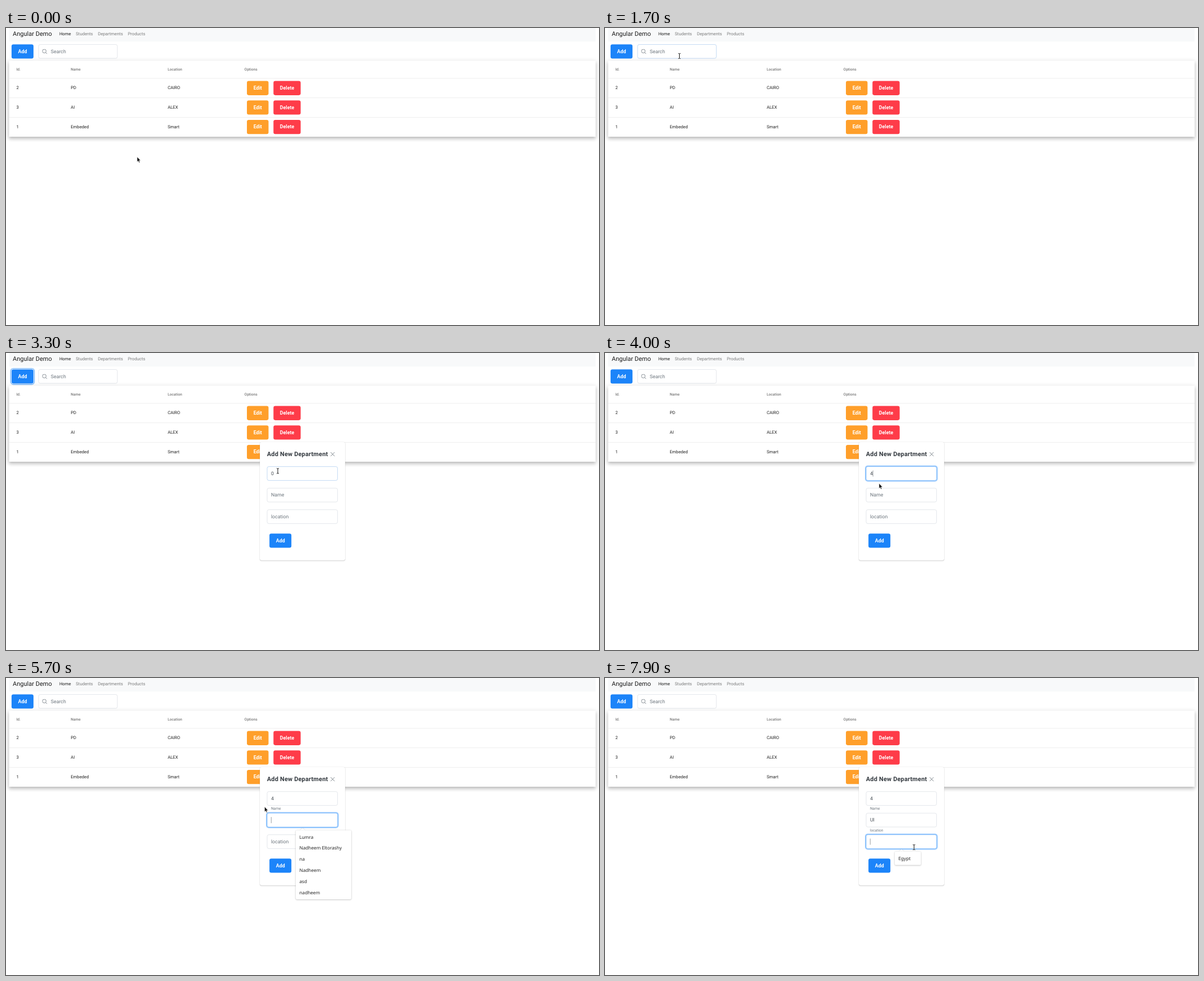
An HTML page that plays this animation: 1056 px wide and 530 px high, repeating every 8 s.

```html
<!DOCTYPE html>
<html lang="en">
<head>
<meta charset="utf-8">
<title>Angular Demo</title>
<style>
  :root { --blue: #1c84f9; }
  html, body { margin: 0; width: 100%; height: 100%; overflow: hidden; background: #fff; }
  * { box-sizing: border-box; }
  /* The page is laid out 1920 px wide and shown at 55 % */
  #page {
    position: absolute; left: 0; top: 0; width: 1920px; height: 964px;
    transform: scale(.55); transform-origin: 0 0;
    font: 16px Roboto, sans-serif; color: rgba(0,0,0,.87);
    text-rendering: geometricPrecision; overflow: hidden;
  }
  #page div, #page span, #page button { position: absolute; white-space: nowrap; }
  nav { position: absolute; left: 10px; top: 0; width: 1899px; height: 44px; background: #f8f9fa; }
  nav span { line-height: 38px; font-size: 14px; color: rgba(0,0,0,.5); }
  nav .brand { left: 12px; font-size: 20px; color: rgba(0,0,0,.9); }
  nav .on { color: rgba(0,0,0,.9); }
  .btn {
    height: 46px; padding: 0; border: 0; border-radius: 6px;
    font: 700 16px/46px Roboto, sans-serif; color: #fff; text-align: center;
    background: var(--blue);
  }
  .warn { background: #ff9f2a; }
  .danger { background: #fe3c49; }
  .field {
    height: 46px; border: 1px solid #ced4da; border-radius: 6px; background: #fff;
    line-height: 44px; color: #495057;
  }
  .field span { left: 12px; top: 0; }
  #search span { left: 39px; color: #6c757d; }
  #search svg { position: absolute; left: 11px; top: 14px; }
  #card {
    left: 10px; top: 106px; width: 1899px; height: 247px; background: #fff;
    box-shadow: 0 5px 5px -3px rgba(0,0,0,.2), 0 8px 10px 1px rgba(0,0,0,.14), 0 3px 14px 2px rgba(0,0,0,.12);
  }
  .row { left: 0; width: 100%; height: 63.3px; border-top: 1px solid #e0e0e0; font-size: 14px; line-height: 62px; }
  .head { height: 57px; border: 0; font-size: 12px; font-weight: 500; line-height: 57px; color: rgba(0,0,0,.54); }
  #dialog {
    left: 822px; top: 289px; width: 276px; height: 384px; background: #fff;
    border-radius: 6px; box-shadow: 0 1px 3px rgba(0,0,0,.3);
  }
  #dialog .field { left: 23px; width: 229px; }
  #dialog .title { left: 23px; top: 24px; font-size: 20px; font-weight: 700; line-height: 30px; letter-spacing: .3px; color: #343a40; }
  #dialog > svg { position: absolute; left: 228px; top: 32px; }
  #dialog .label { left: 36px; line-height: 20px; color: #6c757d; }
  .caret { top: 12px; width: 1px; height: 20px; background: #495057; }
  .menu {
    left: 938px; padding: 4px 0; background: #fff; border-radius: 4px;
    filter: drop-shadow(0 1px 2px rgba(0,0,0,.3));
    font: 14.9px/36px "Noto Sans", sans-serif; color: #222;
  }
  #page .menu div { position: static; padding-left: 12px; }
  .menu::before {
    content: ""; position: absolute; left: 14px; top: -7px;
    border: 8px solid transparent; border-top: 0; border-bottom: 7px solid #fff;
  }
  #pointer { position: absolute; left: 0; top: 0; width: 1056px; height: 530px; }
</style>
</head>
<body>
<div id="page">
  <nav>
    <span class="brand">Angular Demo</span>
    <span class="on" style="left:162.5px">Home</span>
    <span style="left:216px">Students</span>
    <span style="left:287.5px">Departments</span>
    <span style="left:384.5px">Products</span>
  </nav>
  <button class="btn" id="add" style="left:18px;top:53px;width:71px">Add</button>
  <div class="field" id="search" style="left:105px;top:53px;width:256px">
    <svg width="17" height="17" fill="none" stroke="#6c757d" stroke-width="1.5"><circle cx="7" cy="7" r="6"/><path d="M11.4 11.4L16 16"/></svg>
    <span>Search</span>
  </div>
  <div id="card"></div>
  <div id="dialog">
    <span class="title">Add New Department</span>
    <svg width="15" height="15" stroke="#6c757d" stroke-width="1.6"><path d="M1 1L14 14M14 1L1 14"/></svg>
    <div class="field" style="top:79px"><span></span><div class="caret"></div></div>
    <div class="field" style="top:149px"><span></span><div class="caret"></div></div>
    <div class="field" style="top:219px"><span></span><div class="caret"></div></div>
    <span class="label">Name</span>
    <span class="label">location</span>
    <button class="btn" style="left:31px;top:297px;width:71px">Add</button>
  </div>
  <div class="menu" id="names" style="top:494px;width:180px"><div>Lumra</div><div>Nadheem Eltorashy</div><div>na</div><div>Nadheem</div><div>asd</div><div>nadheem</div></div>
  <div class="menu" id="places" style="top:563px;width:85px"><div>Egypt</div></div>
</div>
<svg id="pointer" viewBox="0 0 1056 530">
  <defs><path id="stem" d="M-2-4.6Q0-4.6 0-3.6Q0-4.6 2-4.6M0-3.8V3.8M-2 4.6Q0 4.6 0 3.6Q0 4.6 2 4.6"/></defs>
  <path id="arrow" d="M0 0V8.9L2 7.1L3.4 10.3L4.9 9.7L3.5 6.6H6.2Z" fill="#111" stroke="#fff" stroke-width=".5"/>
  <g id="beam" fill="none"><use href="#stem" stroke="#fff" stroke-width="1.9" opacity=".7"/><use href="#stem" stroke="#111"/></g>
  <path id="hand" d="M-.8 .6Q0-.4 .8 .6V3L4.2 3.8Q5.2 4.2 5 5.4L4.3 8.8H.2L-2.2 5.6Q-2.4 4.4-.8 5Z" fill="#111" stroke="#fff" stroke-width=".4"/>
</svg>
<script>
const LOOP = 8000, STEP = 100, SCALE = .55;
const $ = s => document.querySelector(s), $$ = s => [...document.querySelectorAll(s)];

// Table
const COLS = [23.5, 199.5, 513.5, 762];
const cells = texts => texts.map((s, i) => `<span style="left:${COLS[i]}px">${s}</span>`).join('');
const button = (kind, text, left, width) =>
  `<button class="btn ${kind}" style="left:${left}px;top:7.5px;width:${width}px">${text}</button>`;
$('#card').innerHTML =
  `<div class="row head">${cells(['Id.', 'Name', 'Location', 'Options'])}</div>` +
  [['2', 'PD', 'CAIRO'], ['3', 'AI', 'ALEX'], ['1', 'Embeded', 'Smart']].map((r, i) =>
    `<div class="row" style="top:${57 + i * 63.3}px">${cells(r)}` +
    button('warn', 'Edit', 770, 70) + button('danger', 'Delete', 856, 88) + '</div>').join('');

// Script of the session, in ms
const OPEN = 2500, CLICKS = [3300, 4300, 7300], ID_KEY = 4000, NAME_KEYS = [6200, 6400];
const EVENTS = [...CLICKS, ID_KEY, ...NAME_KEYS];

// Pointer legs: start, end, destination
const HOME = [233.5, 230];
const LEGS = [
  [700, 1600, 150.5, 59.5], [1600, 1700, 132.5, 50], [1700, 2300, 74, 23.5], [2300, 2500, 48.3, 40.5],
  [2600, 2700, 68, 48], [2800, 3000, 391, 181], [3100, 3300, 484, 210.5], [3800, 4200, 492, 255],
  [4900, 5100, 517, 262], [5200, 5400, 460.5, 229.8], [6900, 7200, 550.3, 286], [7300, 7500, 550.3, 302]
];

const ramp = (t, from, to) => Math.min(1, Math.max(0, (t - from) / (to - from)));
const ease = (t, from, time = 300) => 1 - (1 - ramp(t, from, from + time)) ** 2;
const pulse = (t, on, off) => ease(t, on) - ease(t, off);

const pointerAt = t => LEGS.reduce(([x, y], [from, to, nx, ny]) => {
  const p = ramp(t, from, to);
  return [x + (nx - x) * p, y + (ny - y) * p];
}, HOME);

function isOver(t, left, top, width) {
  const [x, y] = pointerAt(t).map(v => v / SCALE);
  return x >= left && x <= left + width && y >= top && y <= top + 46;
}
const overSearch = t => isOver(t, 105, 53, 256);
const overInput = (t, i) => t > OPEN && isOver(t, 845, 368 + 70 * i, 229);
const fade = over => t => (over(t) + over(t - STEP)) / 2;

const inputs = $$('#dialog .field'), labels = $$('#dialog .label');
const show = (el, on) => { el.style.visibility = on ? 'visible' : 'hidden'; };
const border = p => `color-mix(in srgb, #55a4f9 ${p * 100}%, #ced4da)`;

function drawPointer(t) {
  const [x, y] = pointerAt(t);
  const text = overSearch(t) || inputs.some((_, i) => overInput(t, i));
  const shape = text ? 'beam' : isOver(t, 18, 53, 71) ? 'hand' : 'arrow';
  for (const id of ['arrow', 'beam', 'hand']) {
    const el = $('#' + id);
    el.setAttribute('transform', `translate(${x} ${y})`);
    show(el, id === shape);
  }
}

function drawInputs(t) {
  const typed = NAME_KEYS.filter(k => t >= k).length;
  const texts = [t < ID_KEY ? '0' : '4', 'UI'.slice(0, typed), ''];
  const lastEvent = Math.max(...EVENTS.filter(e => e <= t));
  const blink = (t - lastEvent) % 1000 <= 600;
  inputs.forEach((el, i) => {
    const on = CLICKS[i], off = CLICKS[i + 1] ?? LOOP;
    const focus = pulse(t, on, off), [span, caret] = el.children;
    el.style.borderColor = border(Math.max(focus, fade(s => overInput(s, i))(t)));
    el.style.boxShadow = `0 0 0 3.2px rgba(29,135,250,${focus * .45})`;
    span.textContent = texts[i];
    caret.style.left = 12 + span.offsetWidth + 'px';
    show(caret, blink && t > on && t <= off);
  });
  labels.forEach((el, i) => {
    const up = ease(t, CLICKS[i + 1]);
    el.style.top = 162 + 70 * i - 37.5 * up + 'px';
    el.style.fontSize = 16 - 4 * up + 'px';
  });
}

function draw(t) {
  $('#search').style.borderColor = border(fade(overSearch)(t));
  const ring = pulse(t, OPEN, CLICKS[0]);
  $('#add').style.boxShadow = ring ? `0 0 0 2px #fff, 0 0 0 4px rgba(29,135,250,${ring * .75})` : 'none';

  const open = ease(t, OPEN, 200);
  $('#dialog').style.opacity = open;
  $('#dialog').style.transform = `scale(${.7 + .3 * open})`;
  drawInputs(t);
  show($('#names'), t > CLICKS[1] + STEP && t < NAME_KEYS[0]);
  show($('#places'), t > CLICKS[2] + STEP);
  drawPointer(t);
}

const start = performance.now();
function tick() {
  const t = (performance.now() - start) % LOOP;
  draw(Math.floor(t / STEP) * STEP);
  requestAnimationFrame(tick);
}
tick();
</script>
</body>
</html>
```
